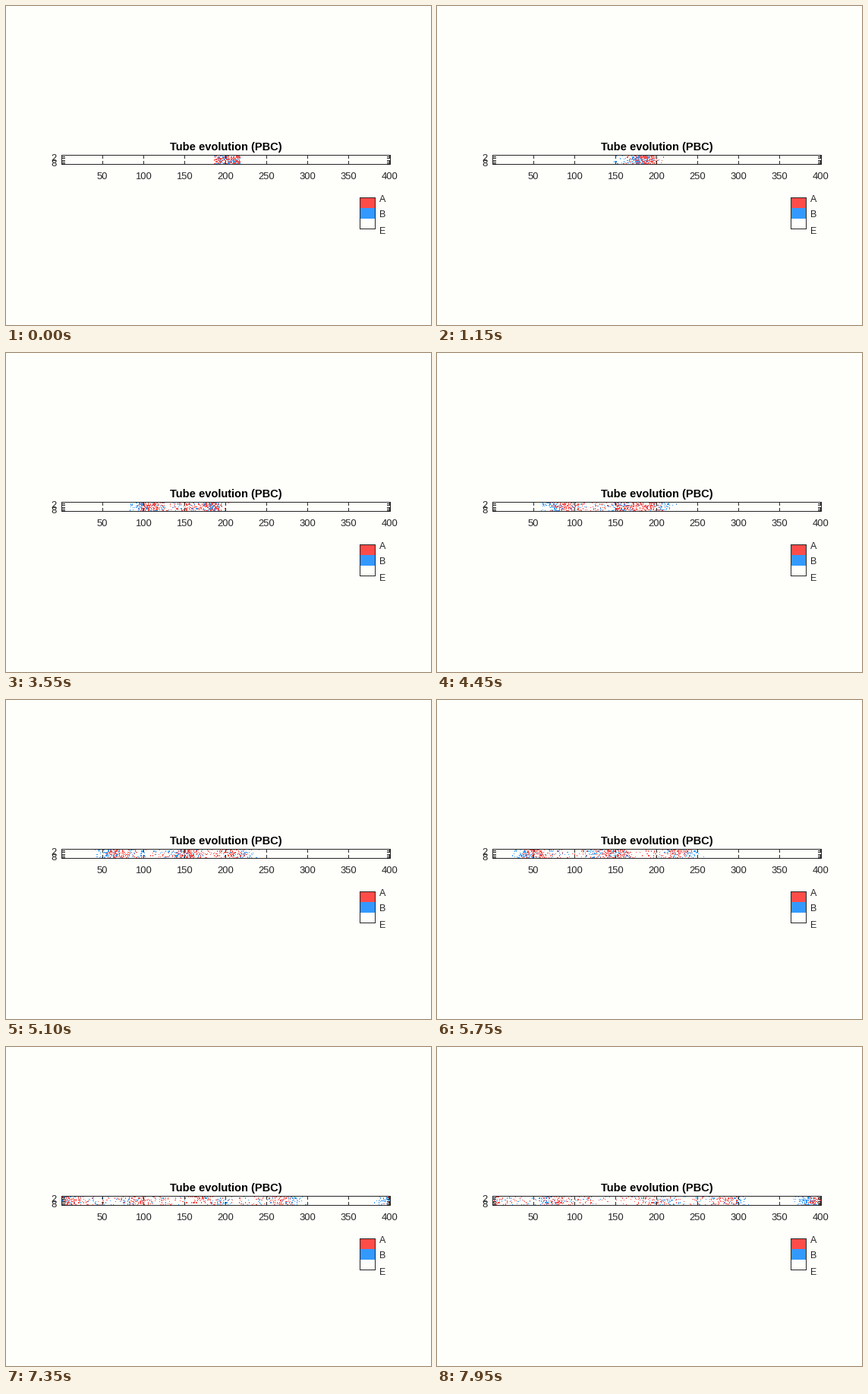
Write a matplotlib script that moves like this. It is 560 px wide and 420 px high and loops after 8 s.

```python
import numpy as np
import matplotlib.pyplot as plt
from matplotlib.animation import FuncAnimation
from matplotlib.patches import Rectangle

W, H, DPI = 560, 420, 100
FRAMES, INTERVAL = 160, 50
COLS, ROWS = 400, 10
LEFT, RIGHT, TOP, BOTTOM = 73, 506, 196, 208  # pixels of the tube outline

PAPER, INK = (254, 254, 251), (38, 38, 38)
RED, BLUE = (255, 76, 72), (51, 153, 255)
PALETTE = np.array([PAPER, RED, BLUE], np.uint8)

SPEED = 1.3  # columns per frame
# launch frame, launch column, direction, number of particles
WAVES = np.array([
    (0, 186, -1, 320),
    (70, 179, -1, 140),
    (70, 184, 1, 180),
    (115, 155, 1, 130),
])


class Swarm:
    """Waves of A cells chasing B cells round a periodic tube."""

    def __init__(self, seed):
        rng = np.random.default_rng(seed)
        wave = rng.permutation(np.repeat(np.arange(len(WAVES)), WAVES[:, 3]))
        n = len(wave)
        self.launch, self.place, self.way, _ = WAVES[wave].T
        self.born = self.launch + rng.integers(-90, 30, n)

        # B leads, A follows; some of both fall further and further behind
        blue = rng.random(n) < 0.36
        self.kind = np.where(blue, 2, 1)
        self.lag = np.where(blue, 0, 10 + rng.exponential(6, n))
        self.drag = 0.65 * rng.random(n) * (rng.random(n) < 0.35)
        self.spread = rng.normal(0, 6.5, n)

        # those alive at the start fill a block in the middle
        cells = rng.permutation(32 * ROWS)[np.arange(n) % (32 * ROWS)]
        self.block = 185 + cells // ROWS
        self.founder = self.born <= 0
        self.row = cells % ROWS

        steps = rng.integers(-1, 2, (FRAMES, n))
        steps[0] = 0
        self.walk = np.cumsum(steps, axis=0)
        self.jitter = rng.normal(0, 0.9, (FRAMES, n))

    def grid(self, frame):
        age = np.maximum(0, frame - self.launch)
        advance = SPEED * age * (1 - self.drag) - self.lag * np.minimum(1, age / 20)
        flow = self.place + self.way * advance + self.spread + self.jitter[frame]
        mix = min(1, frame / 40)
        mix = np.where(self.founder, mix * mix * (3 - 2 * mix), 1)
        x = mix * flow + (1 - mix) * self.block

        live = self.born <= frame
        col = np.rint(x[live]).astype(int) % COLS
        row = (self.row + self.walk[frame])[live] % ROWS
        cells = np.zeros((ROWS, COLS), int)
        cells[row, col] = self.kind[live]
        return PALETTE[cells]


def rgb(color):
    return tuple(c / 255 for c in color)


def fill(x, y, w, h, color=INK, z=3):
    ax.add_patch(Rectangle((x, y), w, h, lw=0, fc=rgb(color),
                           antialiased=False, zorder=z))


def outline(x0, y0, x1, y1):
    for x in (x0, x1):
        fill(x, y0, 1, y1 - y0 + 1)
    for y in (y0, y1):
        fill(x0, y, x1 - x0 + 1, 1)


def label(x, y, text, size=13, **style):
    style = {"color": rgb(INK), "ha": "center", "va": "baseline", **style}
    ax.text(x, y, text, fontsize=size * 72 / DPI, zorder=4, **style)


swarm = Swarm(7)

plt.rcParams["font.family"] = "Liberation Sans"
fig = plt.figure(figsize=(W / DPI, H / DPI), dpi=DPI, facecolor=rgb(PAPER))
ax = fig.add_axes([0, 0, 1, 1])
ax.axis("off")
strip = ax.imshow(swarm.grid(0), interpolation="nearest", aspect="auto",
                  extent=(LEFT + 0.5, RIGHT + 0.5, BOTTOM + 0.5, TOP + 0.5))
ax.set_xlim(0, W)
ax.set_ylim(H, 0)

# tube outline, ticks and labels
outline(LEFT, TOP, RIGHT, BOTTOM)
for value in range(50, COLS + 1, 50):
    x = int(LEFT + 0.5 + (value - 0.5) * (RIGHT - LEFT) / COLS)
    fill(x, TOP, 1, 5)
    fill(x, BOTTOM - 4, 1, 5)
    label(x + 0.2, 228, str(value))
for value in range(2, ROWS + 1, 2):
    y = int(TOP + 0.5 + (value - 0.5) * (BOTTOM - TOP) / ROWS)
    fill(LEFT, y, 5, 1)
    fill(RIGHT - 4, y, 5, 1)
label(67, 204, "2", ha="right")
label(67, 211, "8", ha="right")
label(290, 190, "Tube evolution (PBC)", 14.67, weight="bold", color="black")

# colour key
for i, (name, shade) in enumerate(zip("ABE", (RED, BLUE, PAPER))):
    fill(466, 252 + 14 * i, 21, 14, shade, 2)
    label(492, 257.5 + 21 * i, name, 12.5, ha="left")
outline(466, 252, 486, 293)


def update(frame):
    strip.set_data(swarm.grid(frame))
    return [strip]


anim = FuncAnimation(fig, update, frames=FRAMES, interval=INTERVAL,
                     repeat=True, repeat_delay=0, blit=False)
plt.show()
```
